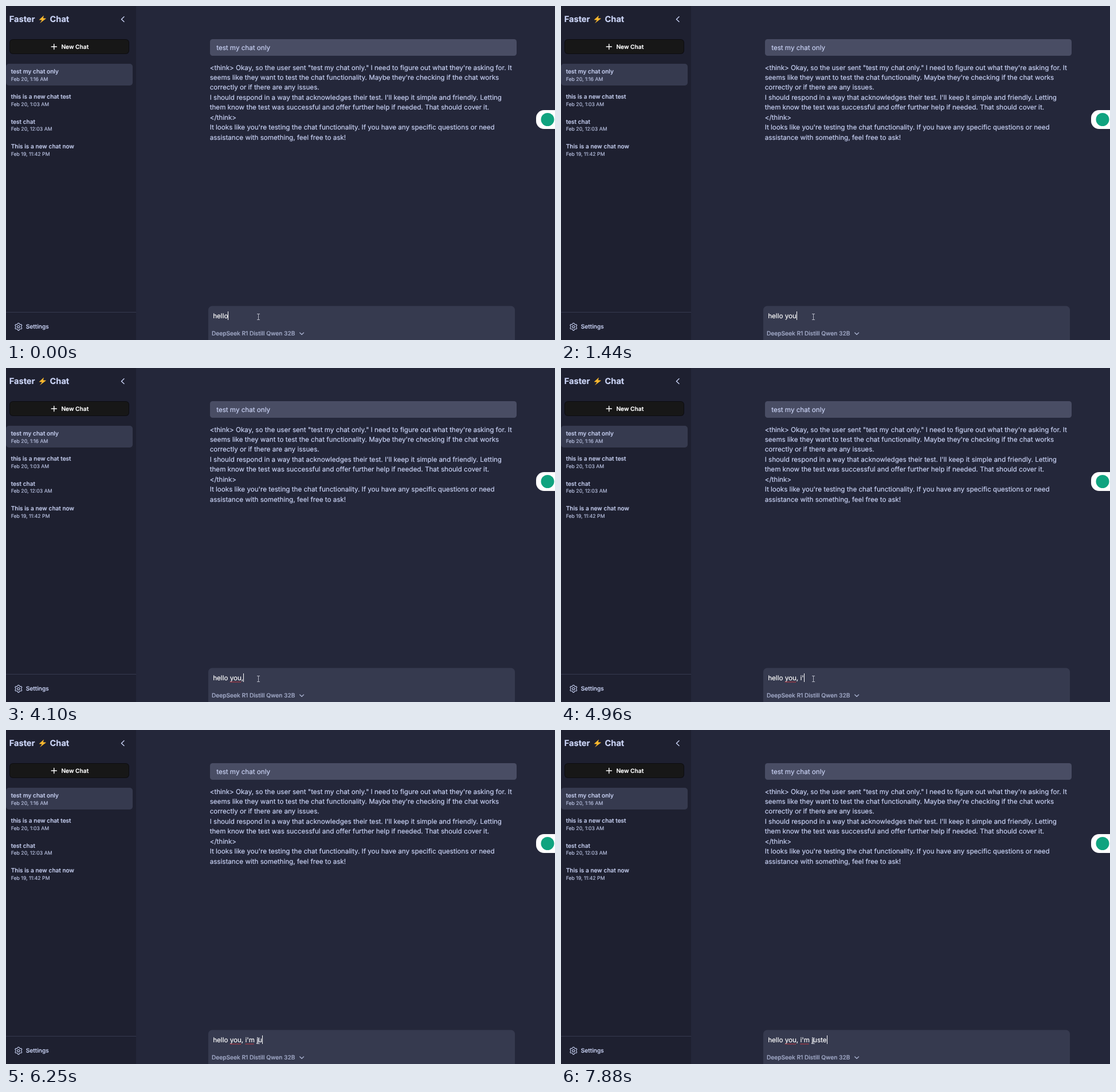
Write an HTML page that moves like this. It is 958 px wide and 584 px high and loops after 7990 ms.

```html
<!DOCTYPE html>
<html lang="en">
<head>
<meta charset="utf-8">
<title>Chat</title>
<style>
  html, body { margin: 0; width: 100%; height: 100%; overflow: hidden; background: #24273a; }
  svg { display: block; }
  text {
    font-family: Inter, sans-serif;
    font-size: 11.64px;
    color: #cad3f5;
    fill: currentColor;
    stroke: currentColor;
    stroke-width: .18px;
    white-space: pre;
    text-rendering: geometricPrecision;
  }
  .brand { font-size: 14.55px; font-weight: 700; }
  .button { font-size: 10.19px; font-weight: 600; color: #fff; }
  .item { font-size: 10.19px; font-weight: 500; }
  .date { font-size: 8.73px; color: #b8c0e0; }
  .model { font-size: 10.19px; font-weight: 500; color: #a5adcb; }
  .typed { color: #fff; }
  .line { fill: none; stroke: #cad3f5; stroke-width: 1.4; stroke-linecap: round; stroke-linejoin: round; }
  .thin { stroke-width: 1.1; }
  .white { stroke: #fff; }
  .muted { stroke: #a5adcb; }
  .pointer { fill: none; stroke: #b4b7c4; }
  .wave { fill: none; stroke: #d63a44; }
</style>
</head>
<body>
<svg id="stage" width="958" height="584" viewBox="0 0 958 584"></svg>
<script>
const LOOP = 7990;
const stage = document.getElementById("stage");

function add(tag, attrs, content) {
  const el = document.createElementNS("http://www.w3.org/2000/svg", tag);
  for (const key in attrs) el.setAttribute(key, attrs[key]);
  if (content) el.textContent = content;
  return stage.appendChild(el);
}
const box = (x, y, width, height, fill, rx = 0) => add("rect", { x, y, width, height, fill, rx });
const label = (x, y, content, cls = "") => add("text", { x, y: Math.round(y), class: cls }, content);
const line = (d, cls = "line") => add("path", { d, class: cls });

// Sidebar
box(0, 0, 227, 584, "#1e2030");
label(5.8, 28, "Faster", "brand");
add("path", { d: "M66 16.6 57.6 24.2 62.8 24.8 59 30.2 70.2 21.8 64.8 21.2Z", fill: "#ffb92e" });
label(76.6, 28, "Chat", "brand");
line("M206 18.8 201.4 23.2 206 27.6");

box(6, 58, 209, 26, "#0c0c10", 6);
box(7, 59, 207, 24, "#171717", 5);
line("M79.2 71.2H88.4M83.8 66.6V75.8", "line white");
label(96.4, 75, "New Chat", "button");

box(0, 101, 221, 38, "#363a4f", 5);
[
  ["test my chat only", "Feb 20, 1:16 AM"],
  ["this is a new chat test", "Feb 20, 1:03 AM"],
  ["test chat", "Feb 20, 12:03 AM"],
  ["This is a new chat now", "Feb 19, 11:42 PM"]
].forEach(([name, date], i) => {
  label(8.7, 118.3 + 43.65 * i, name, "item");
  label(8.7, 130.9 + 43.65 * i, date, "date");
});

box(0, 535, 227, 1, "#363a4f");
gear(21.8, 560.8);
label(34.8, 564, "Settings", "item");

function gear(cx, cy) {
  const points = Array.from({ length: 24 }, (_, i) => {
    const r = i % 4 < 2 ? 6.4 : 4.9;
    const a = (i * 15 - 97.5) * Math.PI / 180;
    return (cx + r * Math.cos(a)).toFixed(2) + " " + (cy + r * Math.sin(a)).toFixed(2);
  });
  line("M" + points.join("L") + "Z", "line thin");
  add("circle", { cx, cy, r: 2.1, class: "line thin" });
}

// Conversation
box(356, 58, 535, 29, "#494d64", 4.5);
label(367.2, 77, "test my chat only");
[
  "<think> Okay, so the user sent \"test my chat only.\" I need to figure out what they're asking for. It",
  "seems like they want to test the chat functionality. Maybe they're checking if the chat works",
  "correctly or if there are any issues.",
  "I should respond in a way that acknowledges their test. I'll keep it simple and friendly. Letting",
  "them know the test was successful and offer further help if needed. That should cover it.",
  "</think>",
  "It looks like you're testing the chat functionality. If you have any specific questions or need",
  "assistance with something, feel free to ask!"
].forEach((row, i) => label(355.7, 111.5 + 17.46 * i, row));

// Side badge
box(925, 182, 50, 33, "#fff", 14);
add("circle", { cx: 945, cy: 198.5, r: 11.5, fill: "#10a37f" });

// Composer
box(353, 524.5, 535, 80, "#363a4f", 7);
label(358.9, 576, "DeepSeek R1 Distill Qwen 32B", "model");
line("M512.7 571.2 516.1 574.5 519.5 571.2", "line muted");

const LEFT = 361.2;
const typed = label(LEFT, 546, "", "typed");
const caret = box(0, 534, 1, 15, "#fff");
line("M438 538.5H443M440.5 538V549M438 548.5H443", "pointer");

function endOf(text) {
  typed.textContent = text;
  return LEFT + typed.getComputedTextLength();
}

// Spelling mark under a word, given the text before it
function mark(before, word) {
  const from = endOf(before), to = endOf(before + word);
  let d = `M${from} 549.5`;
  for (let x = from, i = 1; x < to - 1.5; i++) d += `L${x += 1.5} ${549.5 - i % 2}`;
  return line(d, "wave");
}
const marks = [
  { at: 2560, el: mark("hello ", "you") },
  { at: 5330, el: mark("hello you, ", "i'm") }
];

// Bursts of keys at a steady pace; "<" deletes one character
const PACE = 120, BLINK = 545;
const bursts = {
  120: " ", 1200: "you", 4100: ", ", 4590: "i", 4960: "'",
  5210: "m ", 6040: "j", 6250: "uste ", 7410: " ", 7760: "<<"
};
const keys = Object.entries(bursts).flatMap(([at, chars]) =>
  [...chars].map((char, i) => ({ at: +at + i * PACE, char })));

const show = (el, on) => el.setAttribute("visibility", on ? "visible" : "hidden");
const start = performance.now();

function draw() {
  const t = Math.max(0, performance.now() - start) % LOOP;
  let text = "hello", last = 0;
  for (const { at, char } of keys) {
    if (at > t) break;
    text = char === "<" ? text.slice(0, -1) : text + char;
    last = at;
  }
  caret.setAttribute("x", Math.round(endOf(text)));
  show(caret, Math.floor((t - last) / BLINK) % 2 === 0);
  for (const { at, el } of marks) show(el, t >= at);
  requestAnimationFrame(draw);
}
draw();
</script>
</body>
</html>
```
